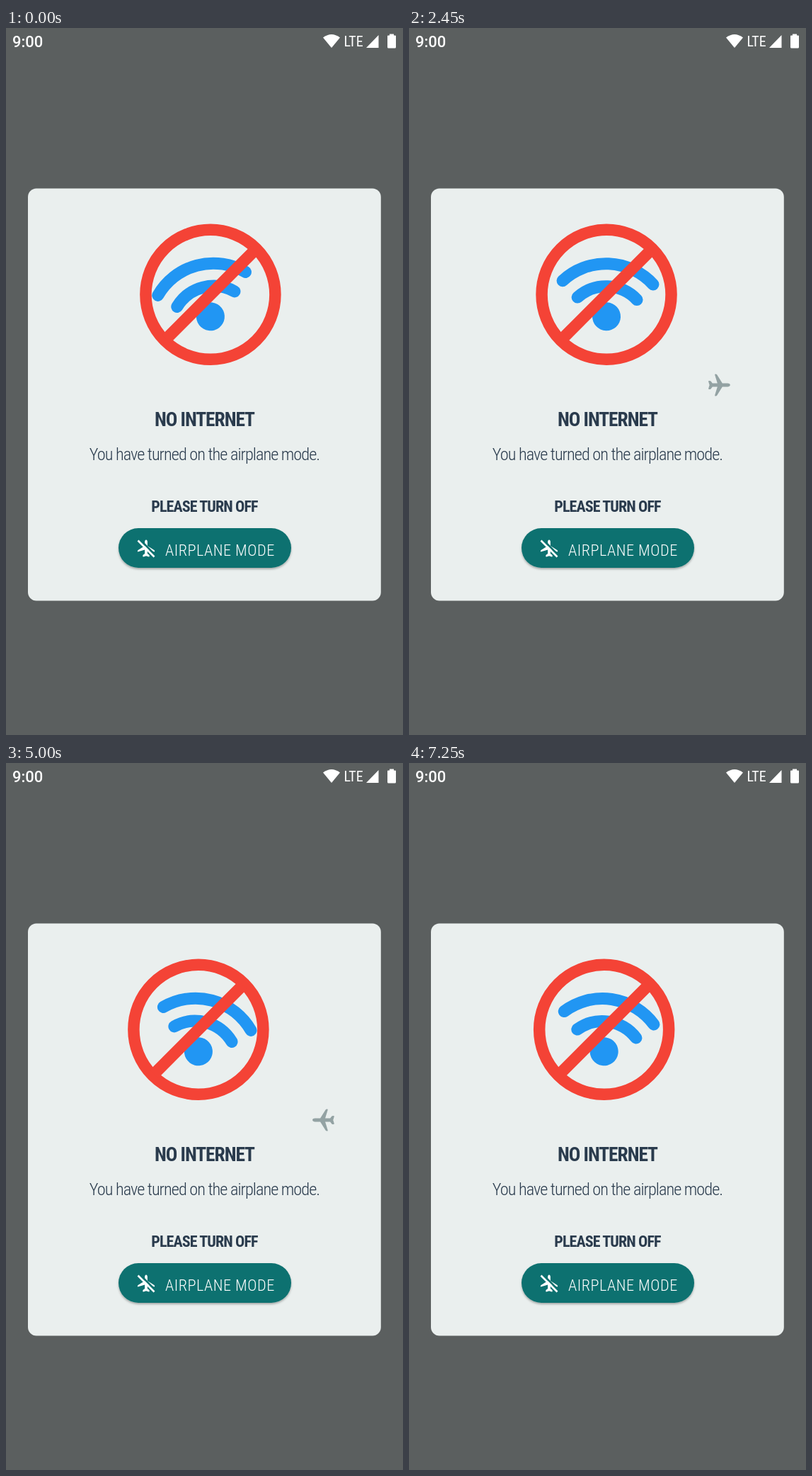
An HTML page for the animation above (7.3 s loop, 561 by 998 pixels).

```html
<!DOCTYPE html>
<html lang="en">
<head>
<meta charset="utf-8">
<title>No internet dialog</title>
<style>
  html, body { margin: 0; width: 100%; height: 100%; overflow: hidden; background: #5b5f5f; }
  svg { display: block; width: 100%; height: 100%; }
  text { font-family: "Roboto Condensed", "Open Sans Condensed", Roboto, sans-serif; font-stretch: 75%; }
  .clock { font: 500 22px Roboto, sans-serif; }
  .copy { fill: #2a3b4d; text-anchor: middle; }
  .copy text { letter-spacing: -.04em; }
  .strong { font-weight: 600; }
  .light { font-weight: 300; }
  .line { fill: none; stroke-width: 17; stroke-linecap: round; }
</style>
</head>
<body>
<svg viewBox="0 0 561 998">
  <defs>
    <path id="half" d="M16 0C16-1.6 14-2.4 12.5-2.4H5L-2.5-14.6C-3.3-15.9-6.1-15.9-5.6-14.3L-2-2.4H-9L-11.3-5.5C-12-6.3-15.2-6.4-14.7-5L-13.2 0Z"/>
    <g id="plane"><use href="#half"/><use href="#half" transform="scale(1 -1)"/></g>
    <rect id="card" x="31" y="226.6" width="498.8" height="582" rx="12"/>
    <clipPath id="cardClip"><use href="#card"/></clipPath>
    <filter id="shadow" x="-10%" y="-20%" width="120%" height="150%">
      <feDropShadow dx="0" dy="2" stdDeviation="1.5" flood-opacity=".3"/>
    </filter>
  </defs>

  <rect width="561" height="998" fill="#5b5f5f"/>

  <g fill="#fff">
    <text class="clock" x="9" y="27">9:00</text>
    <path d="M448 13.5Q460 4.5 472 13.5L460 28Z"/>
    <text x="477.5" y="26" font-size="20">LTE</text>
    <path d="M509 28H526.5V10Z"/>
    <path d="M542 8.5H548V10.5H550Q551 10.5 551 11.5V27Q551 28.5 549.5 28.5H540.5Q539 28.5 539 27V11.5Q539 10.5 540 10.5H542Z"/>
  </g>

  <use href="#card" fill="#eaefee"/>

  <g id="sign">
    <g id="wifi" fill="#2196f3" stroke="#2196f3">
      <circle cy="31" r="20" stroke="none"/>
      <path class="line" d="M-64-17A90.3 90.3 0 0 1 64-17M-42 5.5A60.4 60.4 0 0 1 42 5.5"/>
    </g>
    <g fill="none" stroke="#f44336" stroke-width="16.5">
      <circle r="91.5"/>
      <path d="M-63 63L63-63"/>
    </g>
  </g>

  <g clip-path="url(#cardClip)"><use id="flyer" href="#plane" fill="#93a2a3"/></g>

  <g class="copy">
    <text class="strong" x="280.5" y="562" font-size="27.5">NO INTERNET</text>
    <text class="light" x="280.5" y="609.5" font-size="24.3">You have turned on the airplane mode.</text>
    <text class="strong" x="280.5" y="683" font-size="22">PLEASE TURN OFF</text>
  </g>

  <rect x="159" y="706" width="244" height="56" rx="28" fill="#0b716f" filter="url(#shadow)"/>
  <g transform="translate(198 735)" fill="none" stroke-width="2.6">
    <use href="#plane" fill="#fff" transform="rotate(-90) scale(.78)"/>
    <path d="M-9-13L14 10" stroke="#0b716f"/>
    <path d="M-11.5-11.5L11.5 11.5" stroke="#fff"/>
  </g>
  <text class="light" x="225" y="744.5" font-size="22.3" letter-spacing=".5" fill="#fff">AIRPLANE MODE</text>
</svg>

<script>
  const LOOP = 7300, STEP = 50;
  const part = id => document.getElementById(id);
  const sign = part('sign'), wifi = part('wifi'), flyer = part('flyer');

  const easeInOut = u => u < .5 ? 2 * u * u : 1 - 2 * (1 - u) ** 2;

  // There-and-back progress: 0 to 1 to 0, each way lasting `span` ms.
  function pingPong(t, span) {
    const u = t / span % 2;
    return u < 1 ? u : 2 - u;
  }

  function draw(t) {
    const sway = 8.8 * (1 - 2 * easeInOut(pingPong(t + 90, 1000)));
    sign.setAttribute('transform', `translate(${280.4 + sway} 376.3)`);
    wifi.setAttribute('transform', `rotate(${-1.75 * sway} 0 31)`);

    const flight = t + 250;
    const x = -169 + 899 * pingPong(flight, 4000);
    const facing = flight % 8000 < 4000 ? 1 : -1;
    flyer.setAttribute('transform', `translate(${x} 504) scale(${facing} 1)`);
  }

  const start = performance.now();
  function frame() {
    const t = (performance.now() - start) % LOOP;
    draw(Math.floor(t / STEP) * STEP);
    requestAnimationFrame(frame);
  }
  frame();
</script>
</body>
</html>
```
